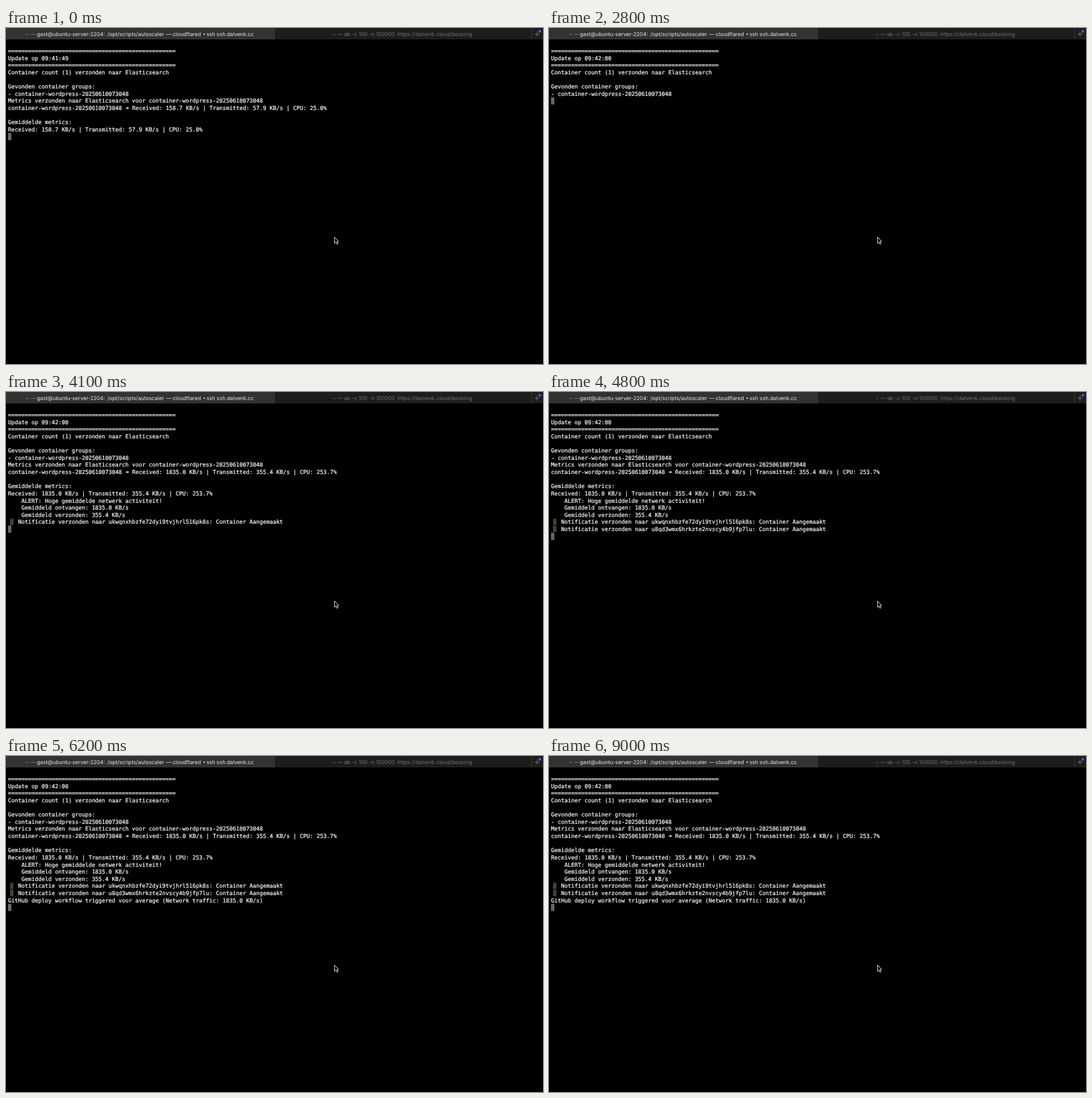
Write an HTML page that moves like this. It is 800x500 px and loops after 9900 ms.

```html
<!DOCTYPE html>
<html lang="nl">
<head>
<meta charset="utf-8">
<title>Autoscaler terminal</title>
<style>
  html, body { margin: 0; width: 100%; height: 100%; overflow: hidden; background: #000; }
  svg { display: block; }
  text { white-space: pre; text-rendering: geometricPrecision; }
  .tab { font: 7.87px Inter, "Open Sans", sans-serif; }
  .term {
    font: 8.305px "DejaVu Sans Mono", "Liberation Mono", monospace;
    fill: #fff;
  }
  .term text { stroke: #fff; stroke-width: .2px; }
</style>
</head>
<body>
<svg width="800" height="500" viewBox="0 0 800 500">
  <rect width="800" height="500"/>
  <rect width="400" height="17" fill="#323232"/>
  <rect x="400" width="400" height="17" fill="#1d1d1d"/>
  <path d="M400 0V17M783 0V17" stroke="#404040" stroke-width=".8"/>
  <g class="tab" id="tabs"></g>
  <path d="M296.2 7.8V10.6L293.5 9.2Z" fill="#e8e8e8"/>
  <path d="M787.5 9.2H794.5M791 5.7V12.7" stroke="#858585" stroke-width=".8"/>
  <circle cx="795.2" cy="4.9" r="2.1" fill="#5450e6"/>
  <g class="term" id="screen"></g>
  <rect id="caret" x="3" width="5" height="10.6" fill="#676767"/>
  <path d="M489.4 311V320.4L491.5 318.4L493 321.8L494.5 321.2L493 317.9H495.6Z" fill="#000" stroke="#e8e8e8" stroke-width=".9"/>
</svg>
<script>
const LOOP = 9900, CELL = 5, LEFT = 3, ROW = 10.63;
const NS = "http://www.w3.org/2000/svg";
const screen = document.getElementById("screen");
const caret = document.getElementById("caret");

function add(parent, tag, attrs, content = "") {
  const el = document.createElementNS(NS, tag);
  for (const key in attrs) el.setAttribute(key, attrs[key]);
  el.textContent = content;
  return parent.appendChild(el);
}

const tabPieces = [
  [29.4, "#8c8c8c", "~ —"],
  [46, "#e8e8e8", "gast@ubuntu-server-2204:"],
  [151, "#e8e8e8", "/opt/scripts/autoscaler"],
  [238.6, "#e8e8e8", "—"],
  [248.3, "#e8e8e8", "cloudflared"],
  [298.7, "#e8e8e8", "ssh ssh.dalvenk.cc"],
  [486.6, "#707070", "~ —"],
  [503.7, "#707070", "ab -c 100 -n 100000"],
  [583, "#707070", "https://dalvenk.cloud/booking"]
];
for (const [x, fill, label] of tabPieces)
  add(document.getElementById("tabs"), "text", { x, y: 12, fill }, label);

const group = "container-wordpress-20250610073048";
const rule = "=".repeat(50);
const header = time => [rule, "Update op " + time, rule];
const found = ["Container count (1) verzonden naar Elasticsearch", "",
  "Gevonden container groups:", "- " + group];

function metrics(received, sent, cpu) {
  const values = `Received: ${received} KB/s | Transmitted: ${sent} KB/s | CPU: ${cpu}%`;
  return [`Metrics verzonden naar Elasticsearch voor ${group}`,
    `${group} ➜ ${values}`, "", "Gemiddelde metrics:", values];
}
const notice = key => `📱 Notificatie verzonden naar ${key}: Container Aangemaakt`;

const before = [...header("09:41:49"), ...found, ...metrics("158.7", "57.9", "25.0")];
const after = [...header("09:42:00"), ...found, ...metrics("1835.0", "355.4", "253.7"),
  "    ALERT: Hoge gemiddelde netwerk activiteit!",
  "    Gemiddeld ontvangen: 1835.0 KB/s",
  "    Gemiddeld verzonden: 355.4 KB/s",
  notice("ukwqnxhbzfe72dyi9tvjhrl516pk8s"),
  notice("u8qd3wmx6hrkzte2nvscy4b9jfp7lu"),
  "GitHub deploy workflow triggered voor average (Network traffic: 1835.0 KB/s)"];

// [start in ms, lines, number of lines printed]
const steps = [[0, before, 12], [2400, after, 3], [2800, after, 7], [3200, after, 15],
  [4100, after, 16], [4800, after, 17], [5200, after, 18]];

function drawPhone(y) {
  add(screen, "rect", { x: 6, y: y - 8, width: 5.2, height: 9.8, rx: .8, fill: "#34342f" });
  add(screen, "path", { d: `M7.3 ${y - 6.7}V${y + 1}M9.7 ${y - 6.7}V${y + 1}`,
    stroke: "#777568", "stroke-width": 1, "stroke-dasharray": "1 1.1" });
}

function drawLine(line, row) {
  const y = 36.95 + row * ROW;
  const put = (column, content) => add(screen, "text", { x: LEFT + column * CELL, y }, content);
  if (line.startsWith("📱")) {
    drawPhone(y);
    put(3, line.slice(3));
    return;
  }
  const arrow = line.indexOf("➜");
  if (arrow < 0) {
    put(0, line);
    return;
  }
  put(0, line.slice(0, arrow));
  put(arrow, "➜");
  put(arrow + 2, line.slice(arrow + 2));
}

let shown;
function render(ms) {
  const step = steps.filter(([start]) => start <= ms).pop();
  if (step === shown) return;
  shown = step;
  const [, lines, count] = step;
  screen.replaceChildren();
  lines.slice(0, count).forEach(drawLine);
  caret.setAttribute("y", 28.75 + count * ROW);
}

const begin = performance.now();
function tick() {
  render((performance.now() - begin) % LOOP);
  requestAnimationFrame(tick);
}
tick();
</script>
</body>
</html>
```
